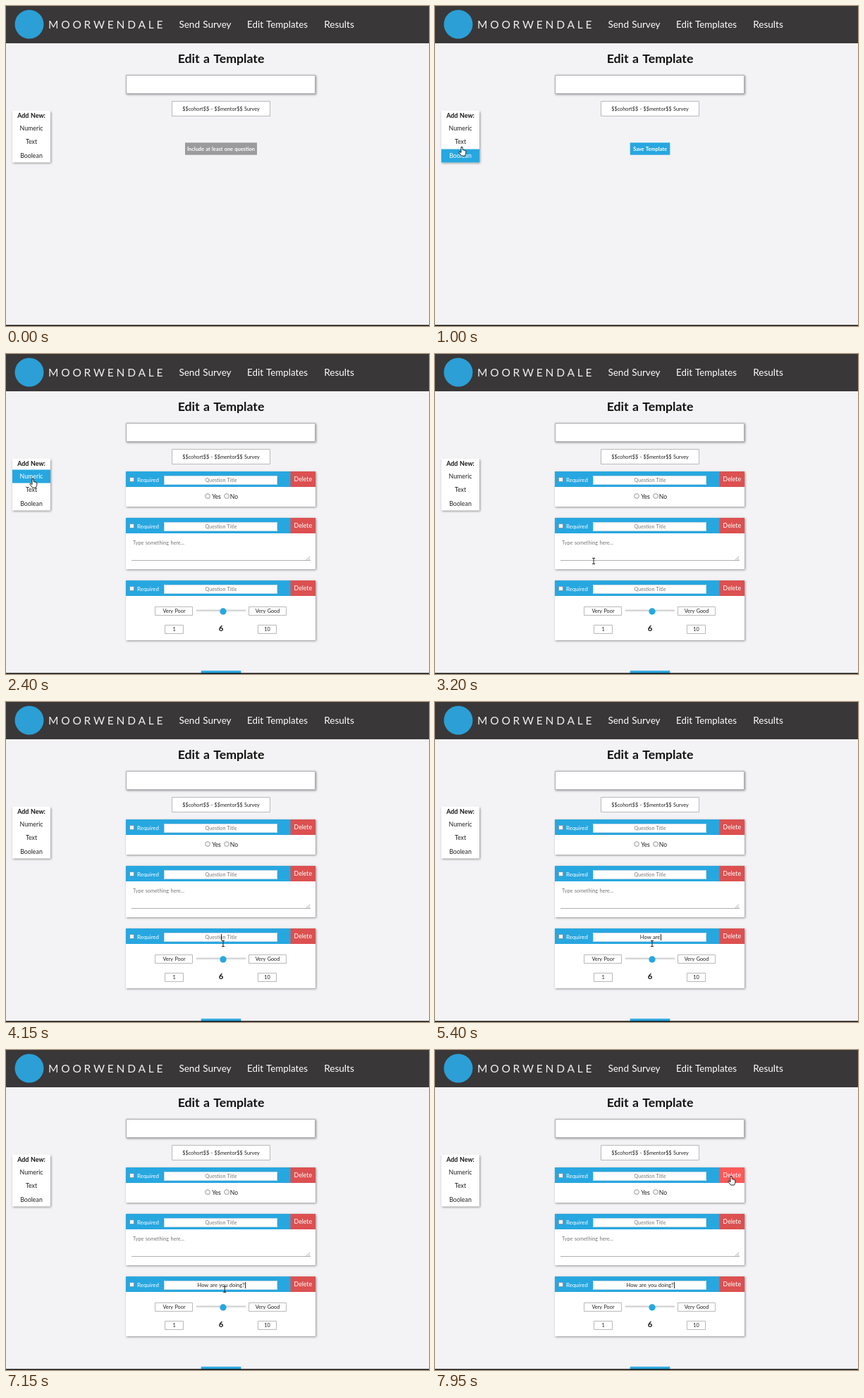
These frames come from a looping animation (600 px wide and 455 px high, 8 s). An HTML page with a canvas:

```html
<!DOCTYPE html>
<html lang="en">
<head>
<meta charset="utf-8">
<title>Edit a Template</title>
<style>
html, body { margin: 0; width: 100%; height: 100%; overflow: hidden; background: #f3f2f4; }
canvas { display: block; width: 600px; height: 455px; }
</style>
</head>
<body>
<canvas id="stage" width="600" height="455"></canvas>
<script>
const ctx = document.getElementById('stage').getContext('2d');
const LOOP = 8000;
const BLUE = '#27a7e0', INK = '#222';
const QUESTION = 'How are you doing?';
const TYPE_START = 4430, KEY_TIME = 136, FOCUS = 3900;
const TYPE_END = TYPE_START + QUESTION.length * KEY_TIME;
const CLICK = 950;

// Cards in order of insertion: time added, height, body painter
const cards = [
  { at: 1000, h: 50, body: drawBoolean },
  { at: 1450, h: 73, body: drawText },
  { at: 1950, h: 85, body: drawNumeric }
];

const menu = [
  { label: 'Numeric', top: 164.5, base: 177 },
  { label: 'Text', top: 184, base: 196 },
  { label: 'Boolean', top: 203.5, base: 215.5 }
];

// Pointer stops: time, x, y
const path = [
  [50, 562, 434], [750, 40, 211], [950, 38, 207], [1000, 38, 200],
  [1200, 38, 192], [1550, 38, 192], [1800, 38, 177], [2600, 38, 177],
  [3550, 308, 337], [7100, 308, 337], [7700, 420, 179], [8000, 420, 179]
];

const clamp = v => Math.max(0, Math.min(1, v));
const ease = v => v * v * (3 - 2 * v);

function pointerAt(t) {
  if (t < path[0][0]) return null;
  for (let i = 1; i < path.length; i++) {
    const [t0, x0, y0] = path[i - 1], [t1, x1, y1] = path[i];
    if (t <= t1) {
      const k = ease((t - t0) / (t1 - t0));
      return { x: x0 + (x1 - x0) * k, y: y0 + (y1 - y0) * k };
    }
  }
}

function inside(p, x, y, w, h) {
  return p && p.x >= x && p.x < x + w && p.y >= y && p.y < y + h;
}

function rect(x, y, w, h, fill) {
  ctx.fillStyle = fill;
  ctx.fillRect(x, y, w, h);
}

function field(x, y, w, h, stroke = '#b9b9bd') {
  rect(x, y, w, h, '#fff');
  ctx.strokeStyle = stroke;
  ctx.lineWidth = 1;
  ctx.strokeRect(x + 0.5, y + 0.5, w - 1, h - 1);
}

function raised(x, y, w, h) {
  ctx.save();
  ctx.shadowColor = 'rgba(0,0,0,.42)';
  ctx.shadowBlur = 3;
  ctx.shadowOffsetX = ctx.shadowOffsetY = 1;
  rect(x, y, w, h, '#fff');
  ctx.restore();
}

function text(str, x, y, size, { color = INK, weight = 400, align = 'center', spacing = 0 } = {}) {
  ctx.font = `${weight} ${size}px Lato, sans-serif`;
  ctx.textAlign = align;
  ctx.letterSpacing = spacing + 'px';
  ctx.wordSpacing = size * 0.06 + 'px';
  ctx.fillStyle = color;
  ctx.fillText(str, x, y);
}

function line(x0, y0, x1, y1, color, width = 1) {
  ctx.strokeStyle = color;
  ctx.lineWidth = width;
  ctx.beginPath();
  ctx.moveTo(x0, y0);
  ctx.lineTo(x1, y1);
  ctx.stroke();
}

function disc(x, y, r, fill, stroke) {
  ctx.beginPath();
  ctx.arc(x, y, r, 0, Math.PI * 2);
  ctx.fillStyle = fill;
  ctx.fill();
  if (stroke) {
    ctx.strokeStyle = stroke;
    ctx.lineWidth = 0.8;
    ctx.stroke();
  }
}

function drawHeader() {
  rect(0, 0, 600, 53, '#393738');
  disc(33, 26, 20.5, '#2b9fd6');
  text('MOORWENDALE', 60, 32.2, 15.5, { color: '#f0f0f0', align: 'left', spacing: 3.8 });
  const white = { color: '#fff' };
  text('Send Survey', 282.5, 30.7, 13.5, white);
  text('Edit Templates', 385, 30.7, 13.3, white);
  text('Results', 472.5, 30.7, 13.6, white);
}

function drawForm() {
  text('Edit a Template', 305, 81, 17.7, { color: '#111', weight: 700 });
  raised(170, 98, 269, 27);
  field(170, 98, 269, 27, '#adadb1');
  field(235, 135, 140, 22);
  text('$$cohort$$ - $$mentor$$ Survey', 305, 148.6, 7.3);
}

function drawMenu(p, t) {
  raised(9, 148.5, 54, 74);
  text('Add New:', 36, 159.3, 8.9, { color: '#111', weight: 700 });
  // The clicked row stays lit for a moment after the pointer leaves it
  const clicked = t >= CLICK && t < CLICK + 100;
  for (const item of menu) {
    const lit = clicked ? item.label === 'Boolean' : inside(p, 9, item.top, 54, 19.5);
    if (lit) rect(9, item.top, 54, 19, BLUE);
    text(item.label, 36, item.base, 8.8, { color: lit ? '#fff' : INK });
  }
}

function drawBoolean(y) {
  disc(286, y + 35, 3.4, '#f4f4f4', '#888');
  disc(313, y + 35, 3.4, '#f4f4f4', '#888');
  text('Yes', 298.5, y + 39, 8.6);
  text('No', 323.5, y + 39, 8.6);
}

function drawText(y) {
  text('Type something here...', 180, y + 37.7, 7.3, { color: '#777', align: 'left' });
  line(178, y + 60.5, 432, y + 60.5, '#b0b0b0');
  line(426, y + 60, 431, y + 55, '#888', 0.7);
  line(429, y + 60, 431, y + 58, '#888', 0.7);
}

function drawNumeric(y) {
  field(211, y + 37, 54, 13);
  field(344, y + 37, 54, 13);
  text('Very Poor', 238.5, y + 46, 7.3);
  text('Very Good', 371, y + 46, 7.3);
  rect(270, y + 41.5, 70, 2.5, '#d6d6d8');
  disc(308, y + 44, 4.7, BLUE);
  field(225, y + 63, 27, 13);
  field(357, y + 63, 27, 13);
  text('1', 238.5, y + 72.3, 7.3);
  text('10', 370.5, y + 72.3, 7.3);
  text('6', 305, y + 71.5, 11.3, { color: '#111', weight: 700 });
}

function drawTitle(y, t, focused) {
  const keys = Math.floor((t - TYPE_START) / KEY_TIME);
  const str = focused ? QUESTION.slice(0, Math.max(0, keys)) : '';
  if (str) text(str, 305, y + 14.7, 7.5);
  else text('Question Title', 305, y + 14.7, 7.1, { color: '#777' });
  if (!focused || t < FOCUS) return;
  const typing = t >= TYPE_START && t < TYPE_END;
  const since = t - (t < TYPE_START ? FOCUS : TYPE_END);
  if (typing || since % 1000 < 500) {
    const half = str ? ctx.measureText(str).width / 2 : 0;
    rect(Math.ceil(305 + half), y + 8, 1, 9, '#222');
  }
}

function drawCard(card, y, t, p, focused) {
  raised(170, y, 269, card.h);
  rect(170, y, 269, 22, BLUE);
  rect(403.5, y, 35.5, 22, inside(p, 403, y, 36, 22) ? '#ff5858' : '#dc5050');
  text('Delete', 421.3, y + 14, 8.7, { color: '#fff' });
  ctx.fillStyle = '#f4f4f4';
  ctx.strokeStyle = '#8a8a8a';
  ctx.lineWidth = 0.8;
  ctx.beginPath();
  ctx.roundRect(175.5, y + 8.5, 6, 6, 1);
  ctx.fill();
  ctx.stroke();
  text('Required', 201.5, y + 15, 7.9, { color: '#fff' });
  field(224, y + 6, 161, 13, '#c9d9e2');
  drawTitle(y, t, focused);
  card.body(y);
}

function drawCards(t, p) {
  let y = 167;
  cards.forEach((card, i) => {
    const k = ease(clamp((t - card.at) / 300));
    if (!k) return;
    ctx.save();
    ctx.globalAlpha = k;
    drawCard(card, y, t, p, i === 2);
    ctx.restore();
    y += (card.h + 16) * k;
  });
  return y + 27;
}

function drawButton(y, t) {
  const ready = t >= CLICK;
  const w = ready ? 56.6 : 102;
  rect(305 - w / 2, y + 0.3, w, 17.4, ready ? BLUE : '#9b9b9d');
  text(ready ? 'Save Template' : 'Include at least one question', 305, y + 11.5, 7.4,
    { color: '#fff', weight: 700 });
}

function shape(points, x, y) {
  ctx.beginPath();
  points.forEach(([dx, dy]) => ctx.lineTo(x + dx, y + dy));
  ctx.closePath();
  ctx.fillStyle = '#fff';
  ctx.strokeStyle = '#111';
  ctx.lineWidth = 0.9;
  ctx.lineJoin = 'round';
  ctx.fill();
  ctx.stroke();
}

const HAND = [[-1, 0.5], [1, 0.5], [1.3, 4.5], [5, 5.5], [6, 7], [5.5, 10.5], [4.5, 13],
  [-0.5, 13], [-4, 8.5], [-3.5, 7], [-1, 8.5]];
const ARROW = [[0, 0], [0, 11], [2.6, 8.6], [4.4, 12.4], [6, 11.6], [4.3, 8], [7.6, 8]];

function drawPointer(p, t) {
  if (!p) return;
  const { x, y } = p;
  const hasCards = t > 2000;
  const overField = inside(p, 170, 98, 269, 27) ||
    hasCards && (inside(p, 224, 327, 161, 14) || inside(p, 178, 260, 254, 34));
  const overLink = inside(p, 9, 164, 54, 58) || hasCards && inside(p, 403, 167, 36, 22);
  if (overField) {
    const cy = y + 6.5;
    line(x, cy - 4, x, cy + 4, '#222');
    line(x - 2, cy - 4, x + 2, cy - 4, '#222');
    line(x - 2, cy + 4, x + 2, cy + 4, '#222');
  } else {
    shape(overLink ? HAND : ARROW, x, y);
  }
}

function draw(t) {
  const p = pointerAt(t);
  rect(0, 0, 600, 455, '#f3f2f4');
  drawHeader();
  drawForm();
  drawMenu(p, t);
  drawButton(drawCards(t, p), t);
  rect(0, 453.5, 600, 1.5, '#111');
  drawPointer(p, t);
}

const start = performance.now();
function tick() {
  const t = (performance.now() - start) % LOOP;
  draw(Math.floor(t / 50) * 50);
  requestAnimationFrame(tick);
}
tick();
</script>
</body>
</html>
```
